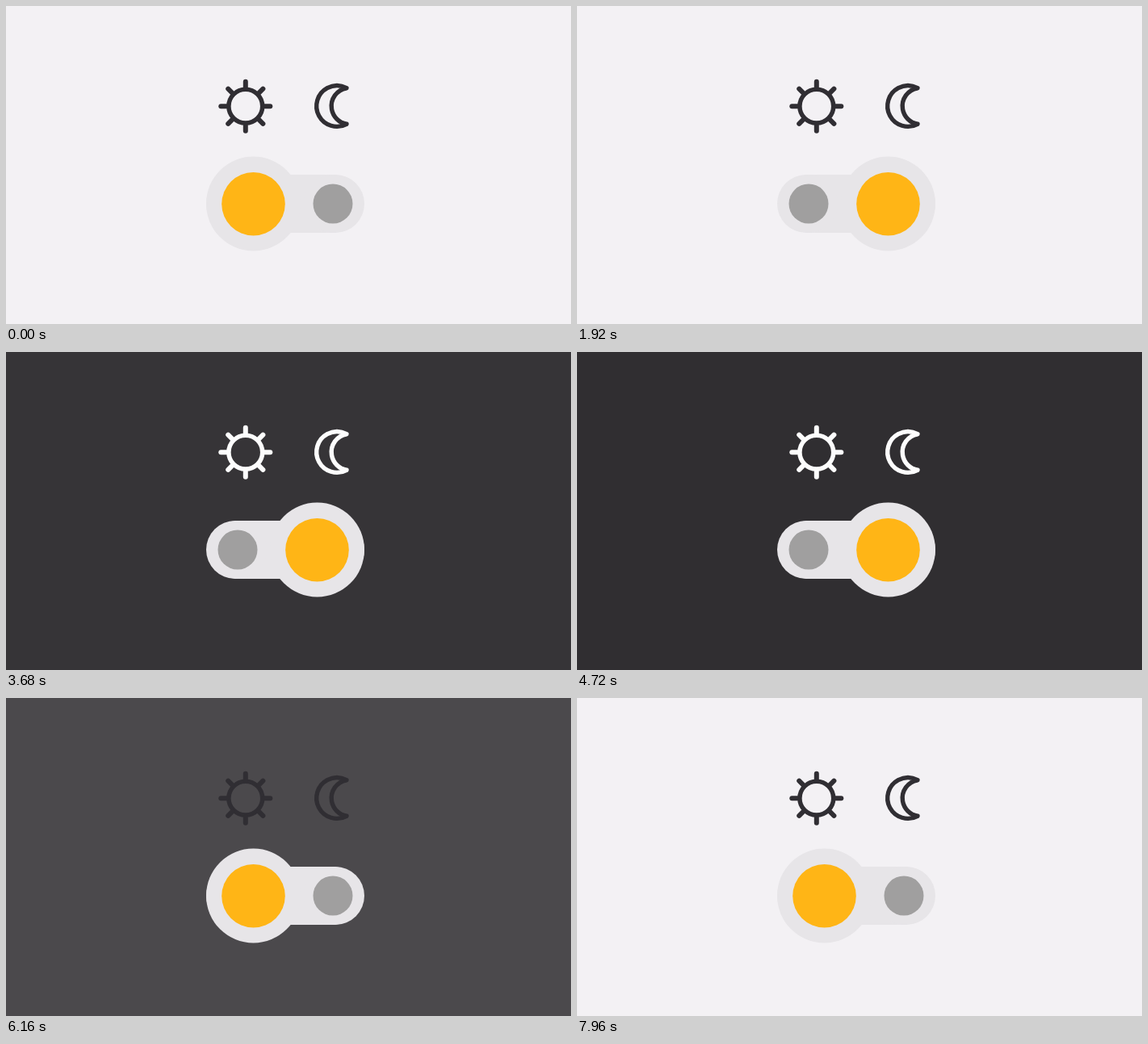
Recreate the animation shown at these times as an HTML page with a canvas. Size 700 by 394 pixels, loop 8000 ms.

```html
<!DOCTYPE html>
<html lang="en">
<head>
<meta charset="utf-8">
<title>Day and night switch</title>
<style>
  html, body { margin: 0; width: 100%; height: 100%; overflow: hidden; background: #f3f1f4; }
  canvas { display: block; width: 100vw; height: 100vh; }
</style>
</head>
<body>
<canvas id="stage"></canvas>
<script>
const W = 700, H = 394, LOOP = 8000;
const TO_NIGHT = 1310, TO_DAY = 4950;
const MORPH = 600, FADE_DELAY = 770, FADE = 1800, ICON_DELAY = 840, ICON_FADE = 300;

const LIGHT = [243, 241, 244], DARK = [48, 46, 49];
const INK = [48, 46, 51], WHITE = [253, 253, 253];
const TRACK = '#e7e5e8', YOLK = '#ffb516', GREY = '#a09f9f';
const MID_X = 346, MID_Y = 245;

const canvas = document.getElementById('stage');
const ctx = canvas.getContext('2d');

const clamp = v => Math.max(0, Math.min(1, v));
const ease = v => (1 - Math.cos(Math.PI * clamp(v))) / 2;
const bump = v => Math.sin(Math.PI * clamp(v));
const mix = (a, b, k) => a + (b - a) * k;
const mixColor = (a, b, k) => `rgb(${a.map((v, i) => Math.round(mix(v, b[i], k)))})`;

// 0 by day, 1 by night
function nightLevel(t, delay, length) {
  return ease((t - TO_NIGHT - delay) / length) - ease((t - TO_DAY - delay) / length);
}

function ellipse(x, y, rx, ry, angle, color) {
  ctx.fillStyle = color;
  ctx.beginPath();
  ctx.ellipse(x, y, rx, ry, angle, 0, Math.PI * 2);
  ctx.fill();
}

function drawSunIcon() {
  ctx.save();
  ctx.translate(296.8, 124.2);
  ctx.lineWidth = 5.5;
  ctx.beginPath();
  ctx.arc(0, 0, 20.9, 0, Math.PI * 2);
  ctx.stroke();
  ctx.lineWidth = 6;
  for (let i = 0; i < 8; i++) {
    ctx.beginPath();
    ctx.moveTo(23.5, 0);
    ctx.lineTo(30.5, 0);
    ctx.stroke();
    ctx.rotate(Math.PI / 4);
  }
  ctx.restore();
}

function drawMoonIcon() {
  const outer = Math.atan2(22.3, 12), inner = Math.atan2(22.3, -3.8);
  ctx.lineWidth = 5.4;
  ctx.beginPath();
  ctx.arc(410, 124, 25.3, outer, -outer);
  ctx.arc(425.8, 124, 22.6, -inner, inner, true);
  ctx.closePath();
  ctx.stroke();
}

// The yolk slides right to left while the grey dot swings below it.
function drawSwitch(ms, mirrored) {
  ctx.save();
  if (mirrored) {
    ctx.translate(MID_X * 2, 0);
    ctx.scale(-1, 1);
  }
  ctx.fillStyle = TRACK;
  ctx.beginPath();
  ctx.roundRect(248, 209, 196, 72, 36);
  ctx.fill();

  const squash = bump(ms / MORPH);
  const sunX = mix(385.5, 306.5, ease(ms / 410));
  const swing = ease((ms - 150) / (MORPH - 150));
  const angle = Math.PI * (1 - swing);
  const sag = Math.sin(angle);
  const dotX = MID_X + 59 * Math.cos(angle);
  const tilt = angle - Math.PI / 2;

  ellipse(sunX, MID_Y, 58.5 - 8 * squash, 58.5 - 11 * squash, 0, TRACK);
  ellipse(dotX, MID_Y + 31.5 * sag, 36 + 33 * sag, 36 + 18.5 * sag, tilt * sag, TRACK);
  ellipse(sunX, MID_Y + 0.3, 39.3 - 7.8 * squash, 39.3 - 14.8 * squash, 0, YOLK);
  ellipse(dotX, MID_Y + 59 * sag, 24.5 - 0.5 * sag, 24.5 - 13 * sag, tilt, GREY);
  ctx.restore();
}

function draw(t) {
  ctx.fillStyle = mixColor(LIGHT, DARK, nightLevel(t, FADE_DELAY, FADE));
  ctx.fillRect(0, 0, W, H);

  ctx.strokeStyle = mixColor(INK, WHITE, nightLevel(t, ICON_DELAY, ICON_FADE));
  ctx.lineCap = ctx.lineJoin = 'round';
  drawSunIcon();
  drawMoonIcon();

  const toDay = t >= TO_DAY;
  const ms = t - (toDay ? TO_DAY : TO_NIGHT);
  drawSwitch(Math.max(0, Math.min(MORPH, ms)), !toDay);
}

function resize() {
  const ratio = window.devicePixelRatio || 1;
  canvas.width = Math.round(innerWidth * ratio);
  canvas.height = Math.round(innerHeight * ratio);
}

function frame() {
  ctx.setTransform(canvas.width / W, 0, 0, canvas.height / H, 0, 0);
  draw((performance.now() - start) % LOOP);
  requestAnimationFrame(frame);
}

addEventListener('resize', resize);
resize();
const start = performance.now();
frame();
</script>
</body>
</html>
```
